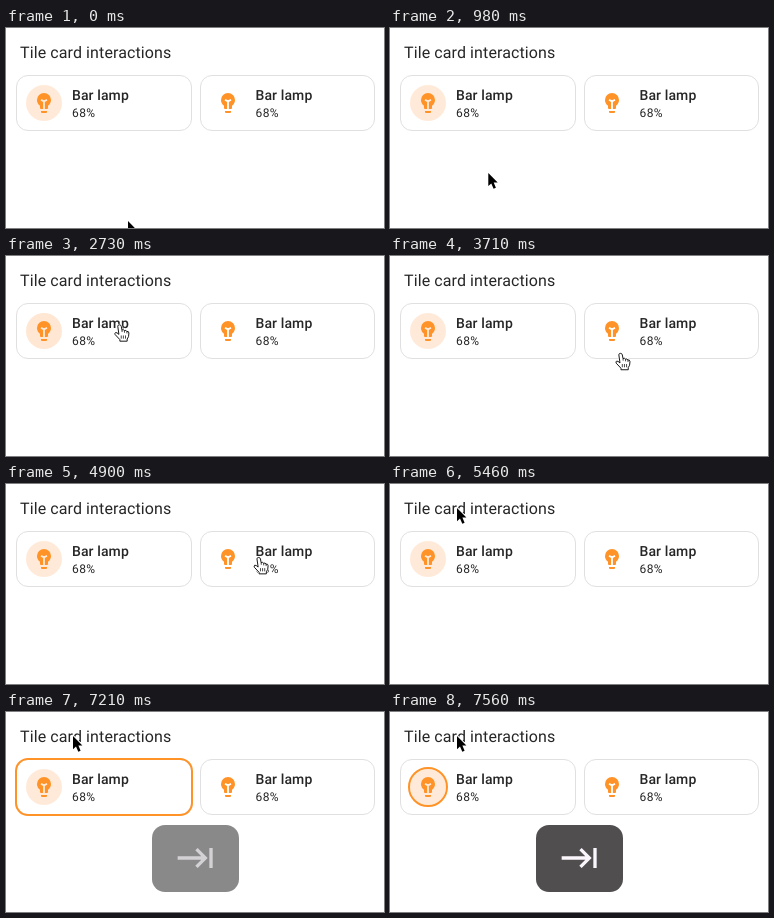
An HTML page with a canvas for the animation above (8000 ms loop, 378 by 200 pixels).

```html
<!DOCTYPE html>
<html lang="en">
<head>
<meta charset="utf-8">
<title>Tile card interactions</title>
<style>
  html, body { margin: 0; width: 100%; height: 100%; overflow: hidden; background: #fff; }
  canvas { display: block; width: 378px; height: 200px; }
</style>
</head>
<body>
<canvas id="stage"></canvas>
<script>
const W = 378, H = 200, LOOP = 8000, STEP = 70;
const ORANGE = '#ff9327', TINT = '#ff923c', INK = '#262626';
const TILE = { y: 47, w: 175.5, h: 56, gap: 8, left: 10 };
const canvas = document.getElementById('stage');
const ctx = canvas.getContext('2d');
const dpr = window.devicePixelRatio || 1;
canvas.width = W * dpr;
canvas.height = H * dpr;

// Pointer moves: each leg starts where the previous one ended.
const origin = { x: 122, y: 193 };
const legs = [
  { start: 0, end: 280, x: 111, y: 160, ease: 4 },
  { start: 910, end: 1470, x: 36.5, y: 71.5 },
  { start: 2030, end: 2730, x: 113.5, y: 68.5, dip: 42 },
  { start: 3360, end: 3990, x: 286, y: 82, dip: 32 },
  { start: 4830, end: 5460, x: 67, y: 24 }
];

const ramp = (t, a, b) => Math.min(1, Math.max(0, (t - a) / (b - a)));

function pointerAt(t) {
  let { x, y } = origin;
  for (const leg of legs) {
    const s = 1 - (1 - ramp(t, leg.start, leg.end)) ** (leg.ease || 1.4);
    x += (leg.x - x) * s;
    y += (leg.y - y) * s + (leg.dip || 0) * Math.sin(Math.PI * s) ** 3;
  }
  return { x, y };
}

const bulb = new Path2D('M0-10A7 7 0 0 0-7-3C-7-.6-5.8 1.5-4 2.7V5A1 1 0 0 0-3 6H3A1 1 0 0 0 4 5V2.7C5.8 1.5 7-.6 7-3A7 7 0 0 0 0-10ZM-3 9A1 1 0 0 0-2 10H2A1 1 0 0 0 3 9V8H-3Z');
const filament = new Path2D('M-3-3.2L0-1.6L3-3.2M0-1.6V6');
const arrow = new Path2D('M0 0V13.2L3 10.5L5.3 15.8L7.6 14.8L5.4 9.6H9.4Z');
const hand = new Path2D('M-1.8 1.7Q-1.7.3-.1.3Q1.5.3 1.8 1.8L2.5 5.6Q4.2 4.8 5 6.2Q6.9 5.5 7.5 7.1Q9.6 6.7 9.7 8.8L9.3 12.5L7.9 15V17.2H.4V15.6L-4.5 10.4Q-5.2 8.8-4.1 8.3Q-2.8 7.9-.6 10.2Z');
const tabIcon = new Path2D('M11.59 7.41L15.17 11H1v2h14.17l-3.59 3.59L13 18l6-6-6-6-1.41 1.41zM20 6v12h2V6h-2z');

function at(x, y, scale, draw) {
  ctx.save();
  ctx.translate(x, y);
  ctx.scale(scale, scale);
  draw();
  ctx.restore();
}

function fill(path, color) {
  ctx.fillStyle = color;
  ctx.fill(path);
}

function line(path, color, width) {
  ctx.strokeStyle = color;
  ctx.lineWidth = width;
  ctx.stroke(path);
}

function box(x, y, w, h, r) {
  const p = new Path2D();
  p.roundRect(x, y, w, h, r);
  return p;
}

function disc(x, y, r) {
  const p = new Path2D();
  p.arc(x, y, r, 0, 2 * Math.PI);
  return p;
}

function text(str, x, y, size, weight, spacing) {
  ctx.font = `${weight} ${size}px Roboto, sans-serif`;
  ctx.letterSpacing = spacing + 'px';
  ctx.textRendering = 'geometricPrecision';
  ctx.fillStyle = INK;
  ctx.fillText(str, x, y);
}

function faded(alpha, draw) {
  if (alpha <= 0) return;
  ctx.globalAlpha = alpha;
  draw();
  ctx.globalAlpha = 1;
}

const tileX = i => TILE.left + i * (TILE.w + TILE.gap);

// Shapes snap to whole pixels, text keeps its fractional place.
function tile(i, tint) {
  const x = tileX(i), left = Math.round(x), right = Math.round(x + TILE.w);
  line(box(left + .5, TILE.y + .5, right - left - 1, TILE.h - 1, 11.5), '#e0e0e0', 1);
  const cx = left + 28, cy = TILE.y + TILE.h / 2;
  faded(tint, () => fill(disc(cx, cy, 18), TINT));
  at(cx, cy, 1, () => {
    fill(bulb, ORANGE);
    line(filament, tint ? '#ffead8' : '#fff', 1.8);
  });
  text('Bar lamp', x + 56, 72, 14, 500, .1);
  text('68%', x + 56, 89, 12, 400, .4);
}

function overTile(x, y) {
  const inside = i => x > tileX(i) && x < tileX(i) + TILE.w;
  return y > TILE.y && y < TILE.y + TILE.h && (inside(0) || inside(1));
}

function drawPointer({ x, y }) {
  ctx.lineJoin = 'round';
  if (overTile(x, y)) {
    at(x, y, .97, () => {
      line(hand, '#fff', 2.2);
      fill(hand, '#fff');
      line(hand, '#111', 1);
      for (let k = 0; k < 3; k++) {
        const fold = 1.8 + k * 2.2, knuckle = 2.5 + k * 2.5;
        line(new Path2D(`M${fold} 11.3v3.3M${knuckle} ${5.6 + k * .7}l.2 2.2`), '#111', .8);
      }
    });
  } else {
    at(x, y, 1, () => {
      line(arrow, '#fff', 2);
      fill(arrow, '#000');
    });
  }
}

function render(t) {
  const tint = .19 + .14 * ramp(t, 1260, 1470) - .11 * ramp(t, 2170, 2450) - .03 * ramp(t, 3010, 3080);
  const toIcon = ramp(t, 7420, 7560);
  const keyShown = ramp(t, 5880, 5950) - ramp(t, 7140, 7350) + ramp(t, 7350, 7420);

  ctx.setTransform(dpr, 0, 0, dpr, 0, 0);
  ctx.fillStyle = '#fff';
  ctx.fillRect(0, 0, W, H);
  text('Tile card interactions', 14, 30, 16, 400, .1);
  tile(0, tint);
  tile(1, 0);
  faded(ramp(t, 6020, 6160) - toIcon, () => line(box(10, 47, 176, 56, 12), ORANGE, 2));
  faded(toIcon, () => line(disc(38, 75, 19), ORANGE, 2));
  faded(keyShown, () => {
    fill(box(146, 113, 87, 67, 13), '#504e4f');
    at(170, 126, 40 / 24, () => fill(tabIcon, '#faf6fc'));
  });
  drawPointer(pointerAt(t));
}

const start = performance.now();
function tick() {
  const t = (performance.now() - start) % LOOP;
  render(Math.floor(t / STEP) * STEP);
  requestAnimationFrame(tick);
}
tick();
</script>
</body>
</html>
```
